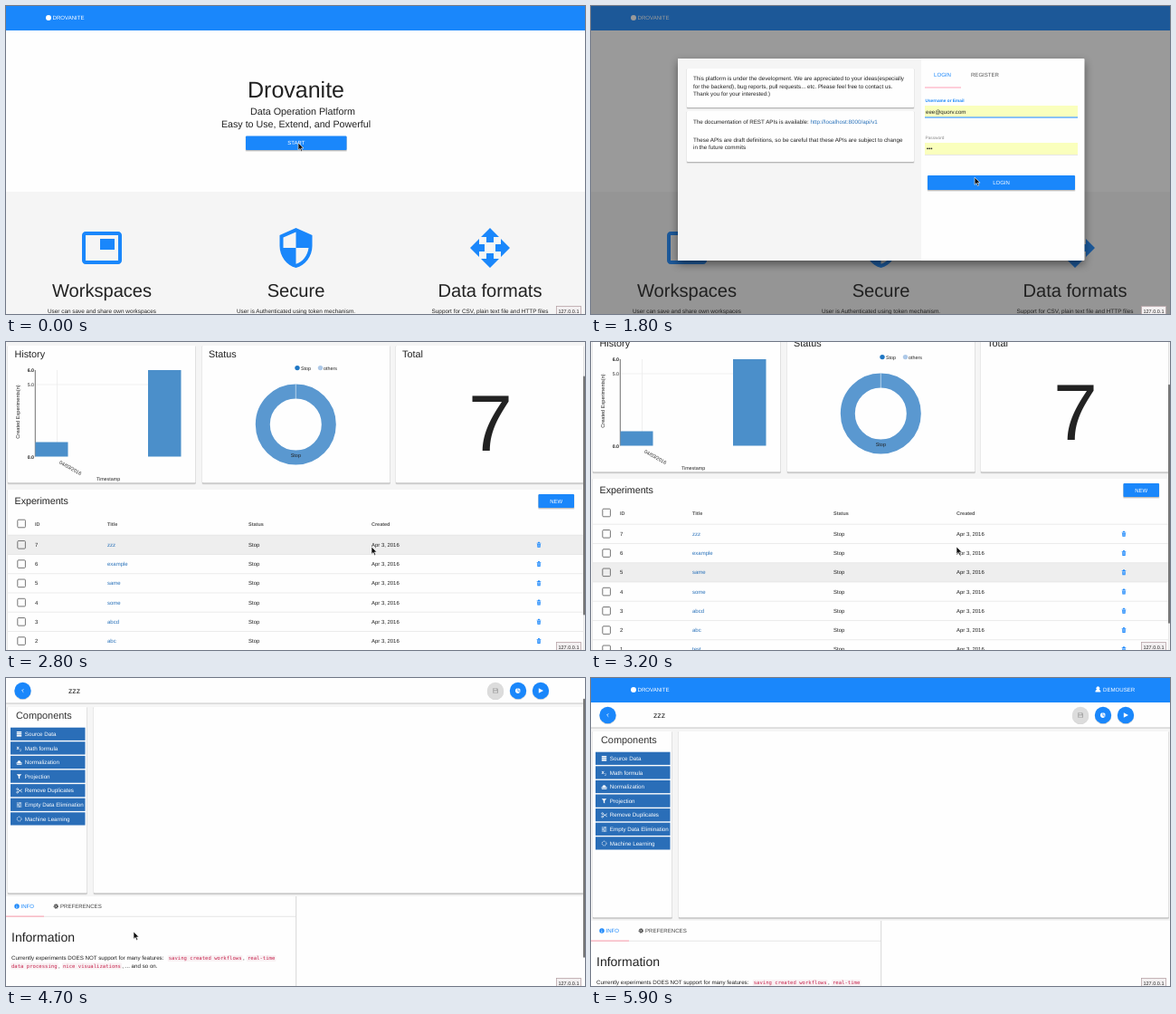
Animation of 640 by 340 pixels, one loop 6000 ms. Source, as an HTML page:

```html
<!DOCTYPE html>
<html lang="en">
<head>
<meta charset="utf-8">
<title>Data platform tour</title>
<style>
  html, body { margin: 0; width: 100%; height: 100%; overflow: hidden; background: #fefefe; }
  svg { display: block; width: 640px; height: 340px; }
  text { font-family: "Liberation Sans", Arial, sans-serif; text-rendering: geometricPrecision; white-space: pre; }
  .mono { font-family: "DejaVu Sans Mono", monospace; }
  .lift { filter: drop-shadow(0 4px 5px rgba(0, 0, 0, .45)); }
</style>
</head>
<body>
<svg id="stage" viewBox="0 0 640 340" xmlns="http://www.w3.org/2000/svg"></svg>
<script>
const LOOP = 6000, STEP = 100;
const BLUE = '#1a87fb', LINK = '#2a72ba', INK = '#222', PAPER = '#fefefe', GREY = '#f5f5f5', MUTED = '#a8a8a8';

// Drawing helpers
const rect = (x, y, w, h, fill, more = '') =>
  `<rect x="${x}" y="${y}" width="${w}" height="${h}" fill="${fill}" ${more}/>`;
const disc = (x, y, r, fill) => `<circle cx="${x}" cy="${y}" r="${r}" fill="${fill}"/>`;
const path = (d, fill, more = '') => `<path d="${d}" fill="${fill}" ${more}/>`;
const line = (d, color, w = 1) => path(d, 'none', `stroke="${color}" stroke-width="${w}"`);
const text = (x, y, s, size, fill = INK, more = '') =>
  `<text x="${x}" y="${y}" font-size="${size}" fill="${fill}" ${more}>${s}</text>`;
const MID = 'text-anchor="middle"', END = 'text-anchor="end"', BOLD = 'font-weight="bold"';
const group = (id, body) => `<g id="${id}">${body}</g>`;
const at = (x, y, body, scale = 1) => `<g transform="translate(${x} ${y}) scale(${scale})">${body}</g>`;
const card = (x, y, w, h, fill = PAPER) =>
  rect(x - .4, y + .3, w + .8, h + 1.4, '#000', 'opacity=".12" rx="1"') +
  rect(x, y + .8, w, h, '#000', 'opacity=".2" rx="1"') +
  rect(x, y, w, h, fill, 'rx="1"');
const button = (x, y, w, h, label) =>
  card(x, y, w, h, BLUE) + text(x + w / 2, y + h / 2 + 2.1, label, 6, '#fff', MID);

const person = path('M0 6V5Q0 3.6 1.6 3.4A2 2 0 1 1 4.2 3.4Q5.8 3.6 5.8 5V6Z', '#fff');
const header = user =>
  rect(0, 0, 640, 27, BLUE) + disc(47, 13, 3, '#fff') +
  text(51.5, 15.2, 'DROVANITE', 6.1, '#fff') +
  (user ? at(557.5, 9.5, person) + text(566, 15.2, 'DEMOUSER', 6.1, '#fff') : '');

// Landing page
const icons = {
  pip: 'M19 7h-8v6h8V7zm2-4H3c-1.1 0-2 .9-2 2v14c0 1.1.9 1.98 2 1.98h18c1.1 0 2-.88 2-1.98V5c0-1.1-.9-2-2-2zm0 16.01H3V4.98h18v14.03z',
  shield: 'M12 1L3 5v6c0 5.55 3.84 10.74 9 12 5.16-1.26 9-6.45 9-12V5l-9-4zm0 10.99h7c-.53 4.12-3.28 7.79-7 8.94V12H5V6.3l7-3.11v8.8z',
  move: 'M10 9h4V6h3l-5-5-5 5h3v3zm-1 1H6V7l-5 5 5 5v-3h3v-4zm14 2l-5-5v3h-3v4h3v3l5-5zm-9 3h-4v3H7l5 5 5-5h-3v-3z'
};
const feature = (x, icon, name, note) =>
  at(x - 24, 243, path(icons[icon], BLUE), 2) +
  text(x, 320.5, name, 20.1, INK, MID) + text(x, 338.5, note, 6.4, INK, MID);
const home =
  rect(0, 0, 640, 340, PAPER) + rect(0, 205, 640, 135, GREY) + header(false) +
  text(320.5, 100.5, 'Drovanite', 25, INK, MID) +
  text(328, 119.8, 'Data Operation Platform', 10.75, INK, MID) +
  text(320.5, 133.6, 'Easy to Use, Extend, and Powerful', 10.7, INK, MID) +
  button(265, 143.5, 111.5, 15.5, 'START') +
  feature(106, 'pip', 'Workspaces', 'User can save and share own workspaces') +
  feature(320.5, 'shield', 'Secure', 'User is Authenticated using token mechanism.') +
  feature(535, 'move', 'Data formats', 'Support for CSV, plain text file and HTTP files');

// Login dialog
const mail = 'eee@quorv.com', YELLOW = '#faffbd';
const notes = [
  [82.3, 'This platform is under the development. We are appreciated to your ideas(especially'],
  [90.8, 'for the backend), bug reports, pull requests... etc. Please feel free to contact us.'],
  [99.2, 'Thank you for your interested:)'],
  [130.2, `The documentation of REST APIs is available: <tspan fill="${LINK}">http://localhost:8000/api/v1</tspan>`],
  [149.8, 'These APIs are draft definitions, so be careful that these APIs are subject to change'],
  [158.2, 'in the future commits']
];
const dialog =
  rect(96, 58, 449.5, 223, PAPER, 'class="lift" rx="1"') +
  rect(96, 58, 269, 223, GREY) +
  card(106, 69, 251, 43) + card(106, 116, 251, 56) +
  notes.map(([y, s]) => text(113, y, s, 6.25)).join('') +
  text(379, 78.2, 'LOGIN', 6.1, BLUE) + text(420, 78.2, 'REGISTER', 6.05, '#555') +
  rect(369, 89.5, 40, 1, '#ff9fb8') +
  text(369.5, 105.6, 'Username or Email', 4.75, BLUE, BOLD) +
  rect(369, 110, 169, 12.5, YELLOW) +
  group('picked', rect(369.5, 112.5, 45, 8, '#a5cbed')) +
  text(370, 118.8, mail, 6.1) +
  rect(369, 122.5, 169, 1, BLUE) +
  text(369.5, 147, 'Password', 4.75, '#888') +
  rect(369, 151, 169, 13, YELLOW) + rect(369, 164, 169, .5, '#ccc') +
  [372, 374.2, 376.4].map(x => disc(x, 157.3, .85, INK)).join('') +
  group('choices', rect(369.5, 123.8, 168, 24, '#fff', `stroke="${MUTED}" stroke-width=".7"`) +
    text(371, 132.3, mail, 6.4) + text(371, 144.3, 'eee', 6.4)) +
  button(372, 187, 163, 16, 'LOGIN');

// Experiment list
const trash = path('M0 1h1.4V.2h1.8V1h1.4v.8H0zM.4 2.3h3.8L3.9 6H.7z', BLUE) +
  line('M1.6 2.8V5.4M3 2.8V5.4', '#fff', .4);
const box = y => rect(12.8, y - 4.3, 8.6, 8.6, PAPER, 'rx="1" stroke="#666" stroke-width=".9"');
const checkbox = y => box(y).replace(PAPER, 'none');
const ROW = 21.25, ROW_TOP = 261.2;
const titles = ['zzz', 'example', 'same', 'some', 'abcd', 'abc', 'test'];
const row = (name, i) => {
  const y = ROW_TOP + ROW * (i + .5), base = y + 2.1;
  return line(`M2 ${ROW_TOP + ROW * (i + 1)}H638`, '#ddd', .6) + checkbox(y) +
    text(32, base, 7 - i, 6) + text(112, base, name, 6, LINK) + text(268, base, 'Stop', 6) +
    text(404, base, 'Apr 3, 2016', 5.95) + at(586.7, y - 3.2, trash);
};
const heads = [[32, 'ID'], [112, 'Title'], [268, 'Status'], [404, 'Created']];
const chart =
  line('M32 95H193M56.5 79V174', '#e6e6e6', .6) + line('M32.3 79V174.5', '#333', .7) +
  rect(32.5, 158.5, 36, 16, '#4b8fca') + rect(157, 79, 36.5, 95.5, '#4b8fca') +
  text(31, 81, '6.0', 5.3, INK, `${END} ${BOLD}`) + text(31, 97, '5.0', 5.3, INK, END) +
  text(31, 176.5, '0.0', 5.3, INK, `${END} ${BOLD}`) +
  text(0, 0, 'Created Experiments(n)', 5.6, INK, MID + ' transform="translate(14.5 125) rotate(-90)"') +
  text(0, 0, '04/03/2016', 5.4, INK, 'transform="translate(58.5 182) rotate(29)"') +
  text(113, 201, 'Timestamp', 5.35, INK, MID);
const donut =
  `<circle cx="320.3" cy="139" r="36.5" fill="none" stroke="#5a98d0" stroke-width="16"/>` +
  line('M320.3 94V111', '#dceaf6', .7) + text(320.3, 175, 'Stop', 5.5, INK, MID) +
  disc(322, 76.6, 2.7, '#1f77c4') + text(326, 78.6, 'Stop', 5.4) +
  disc(347.5, 76.6, 2.7, '#aec9e8') + text(351, 78.6, 'others', 5.4);
const flask = path('M1.6 0H4v.7H3.6V2.4L5.6 5.4Q5.8 6 5 6H.6Q-.2 6 0 5.4L2 2.4V.7H1.6Z', BLUE);
const lab =
  rect(0, 0, 640, 440, GREY) + rect(0, 27, 640, 21, PAPER) + header(true) +
  at(9.5, 34.3, flask) + text(17, 39.7, 'EXPERIMENT', 6, BLUE) + rect(0, 47, 68, 1, '#f0506e') +
  [2, 217, 431].map(x => card(x, 52, 207.5, 151.5)).join('') +
  text(9.5, 65.3, 'History', 10.8) + text(224, 65.3, 'Status', 10.8) + text(438, 65.3, 'Total', 10.8) +
  chart + donut + text(535.5, 167.5, '7', 88, INK, MID) +
  card(2, 210.5, 636, 220) + text(9.5, 227.2, 'Experiments', 10.7) +
  button(588.5, 216, 39.5, 15, 'NEW') + checkbox(248.5) +
  heads.map(([x, s]) => text(x, 250.5, s, 5.5, '#555', BOLD)).join('') +
  rect(2, 0, 636, ROW, '#eee', 'id="hover"') +
  line(`M2 ${ROW_TOP}H638`, '#ddd', .6) + titles.map(row).join('');

// Workflow editor
const W = '#fff';
const parts = [
  ['Source Data', rect(0, 0, 5.4, 1.5, W) + rect(0, 2, 5.4, 1.5, W) + rect(0, 4, 5.4, 1.6, W)],
  ['Math formula', text(-.2, 4.9, 'x', 6, W, BOLD) + text(3.3, 6.3, '2', 3.8, W)],
  ['Normalization', path('M.8 2.5A2 2 0 0 1 4.6 2.5V3.4H6V4.2H-.4V3.4H.8ZM0 4.8H5.6V5.6H0Z', W)],
  ['Projection', path('M0 .4H5.4L3.4 2.8V5.8L2 4.8V2.8Z', W)],
  ['Remove Duplicates', line('M1.4 1.6L6 4.6M1.4 4.4L6 1.4', W, .7) +
    `<g fill="none" stroke="#fff" stroke-width=".7"><circle cx=".8" cy="1.2" r=".9"/><circle cx=".8" cy="4.8" r=".9"/></g>`],
  ['Empty Data Elimination', line('M0 1H5.6M0 3H5.6M0 5H5.6M3.8 .2V1.8M1.4 2.2V3.8M3.2 4.2V5.8', W, .7)],
  ['Machine Learning', `<circle cx="2.8" cy="3" r="2.4" fill="none" stroke="#fff" stroke-width=".9" stroke-dasharray="1.1 .78"/>`]
];
const part = ([name, icon], i) => {
  const y = 81.7 + 15.6 * i;
  return rect(5, y, 82.5, 14.2, '#2a6eb8') + at(11.8, y + 4.3, icon) + text(20.8, y + 9.3, name, 6.25, W);
};
const round = (x, fill, icon) => disc(x, 41.9, 9.2, '#00000026') + disc(x, 41, 9.2, fill) + icon;
const code = (x, y, s) =>
  rect(x - 1, y - 5.3, s.length * 3.372 + 2, 7, '#f9f2f4', 'rx="1"') + text(x, y, s, 5.6, '#c7254e', 'class="mono"');
const cog = disc(0, 0, 2, '#444') +
  `<circle r="2.3" fill="none" stroke="#444" stroke-width="1" stroke-dasharray="1.1 .706"/>` + disc(0, 0, .8, W);
const flow =
  rect(0, 0, 640, 410, PAPER) + rect(0, 54, 640, 214, GREY) +
  rect(0, 54, 640, 1.6, '#000', 'opacity=".18"') + rect(0, 27, 640, 27.5, PAPER) + header(true) +
  round(18.5, BLUE, line('M19.3 39.3L17.6 41L19.3 42.7', W, .8)) +
  text(69, 44.2, 'zzz', 8.7) +
  round(541, '#dcdcdc', path('M538.2 38.2H543L544 39.2V43.8H538.2Z', MUTED) +
    rect(539.3, 38.8, 3, 1.5, '#dcdcdc') + rect(539.3, 41.3, 3.6, 1.9, '#dcdcdc')) +
  round(566, BLUE, disc(565.8, 41.1, 2.8, W) + line('M565.8 38V41.1H569M565.8 41.1L568 43.3', BLUE, .6)) +
  round(591, BLUE, path('M588.8 38.2L594 41L588.8 43.8Z', W)) +
  card(2, 58.5, 87.5, 206) + card(97, 58.5, 541.5, 206) +
  text(11, 71.7, 'Components', 10.9, '#333') + parts.map(part).join('') +
  rect(0, 268, 640, 142, PAPER) + line('M320.7 268V410', '#ccc', .8) + line('M0 290.3H320.5', '#ddd', .7) +
  disc(12, 279, 2.7, BLUE) + text(12, 280.9, 'i', 4.8, W, `${MID} ${BOLD}`) +
  text(16.5, 281.1, 'INFO', 6.1, BLUE) + rect(0, 289.6, 42, 1, '#ff9fb0') +
  at(55.3, 279, cog) + text(60, 281.1, 'PREFERENCES', 6.1, '#444') +
  text(6, 318.3, 'Information', 14) +
  text(6, 338.3, 'Currently experiments DOES NOT support for many features:', 6.2) +
  code(179.7, 338.3, 'saving created workflows') + text(262, 338.3, ',', 6.2) + code(267, 338.3, 'real-time') +
  code(6, 346.8, 'data processing') + text(58, 346.8, ',', 6.2) +
  code(63, 346.8, 'nice visualizations') + text(128.3, 346.8, ', ... and so on.', 6.2);

// Fixed layer
const overlay =
  rect(638, 0, 2, 10, '#777', 'id="bar" rx="1"') +
  rect(608.5, 331.5, 27, 12, '#f3f0f1', 'stroke="#b9a5a8" stroke-width=".8"') +
  text(610.5, 338.9, '127.0.0.1', 5.5) +
  group('arrow', path('M0 0V8.2L2 6.4L3.3 9.4L4.7 8.8L3.4 5.9H6Z', '#111', 'stroke="#fff" stroke-width=".6"')) +
  group('beam', line('M-2-4Q0-4 0-3Q0-4 2-4M0-3V3.5M-2 4.5Q0 4.5 0 3.5Q0 4.5 2 4.5M-1 .8H1', '#111', .9));

const stage = document.getElementById('stage');
stage.innerHTML = group('home', home) + rect(0, 0, 640, 340, '#212121', 'id="dim"') +
  group('dialog', dialog) + group('lab', lab) + group('flow', flow) + overlay;

// Motion
const $ = id => document.getElementById(id);
const show = (id, on) => $(id).setAttribute('display', on ? 'inline' : 'none');
const move = (id, x, y) => $(id).setAttribute('transform', `translate(${x} ${y})`);
const clamp = v => Math.max(0, Math.min(1, v));
const ease = v => v * v * (3 - 2 * v);
// Keys are [time, ...values]; returns the values at t.
function track(keys, t, curve = v => v) {
  let i = 0;
  while (i < keys.length - 2 && t >= keys[i + 1][0]) i++;
  const [a, b] = [keys[i], keys[i + 1]];
  const k = curve(clamp((t - a[0]) / (b[0] - a[0])));
  return a.slice(1).map((v, j) => v + (b[j + 1] - v) * k);
}
const pointer = [
  [0, 323, 151], [400, 323, 151], [900, 416, 113], [1400, 416, 113], [1900, 425, 198], [2300, 425, 198],
  [2700, 404, 226], [3500, 404, 226], [4000, 116, 271], [4300, 116, 271], [4600, 141, 280],
  [5300, 141, 280], [5700, 200, 345]
];
const labScroll = [[2600, 0], [3000, 96], [3100, 96], [3200, 60], [3500, 0]];
const flowScroll = [[4500, 0], [4700, 27], [4900, 64], [5200, 64], [5500, 0]];

function draw(t) {
  const page = t < 2400 ? 'home' : t < 4300 ? 'lab' : 'flow';
  for (const id of ['home', 'lab', 'flow']) show(id, id === page);

  const opening = ease(clamp((t - 100) / 400)), closing = clamp((t - 2100) / 110);
  const seen = opening * (1 - closing), size = (.5 + .5 * opening) * (1 - .5 * closing);
  show('dialog', seen > 0);
  $('dialog').setAttribute('opacity', seen);
  $('dialog').setAttribute('transform', `translate(320.5 169.5) scale(${size}) translate(-320.5 -169.5)`);
  $('dim').setAttribute('opacity', page === 'home' ? .45 * opening * clamp(1 - closing * 1.2) : 0);
  const typing = t >= 900 && t < 1400;
  show('choices', typing);
  show('picked', typing);

  const [x, y] = track(pointer, t, ease);
  const onLink = t >= 4000 && t < 4300;
  for (const id of ['arrow', 'beam']) move(id, x, y);
  show('beam', typing || onLink);
  show('arrow', !typing && !onLink && t < 5700);

  const [ls] = track(labScroll, t), [fs] = track(flowScroll, t);
  move('lab', 0, -ls);
  move('flow', 0, -fs);
  // The hovered row is refreshed only once scrolling stops.
  const still = t >= 3000 && t < 3500 ? 96 : ls;
  const hit = Math.floor((y + still - ROW_TOP) / ROW);
  show('hover', hit >= 0 && hit < titles.length);
  $('hover').setAttribute('y', ROW_TOP + ROW * hit);

  const inLab = page === 'lab';
  show('bar', inLab ? t >= 2600 : t >= 4500 && t < 5700);
  $('bar').setAttribute('y', inLab ? ls * .78 : fs * .84);
  $('bar').setAttribute('height', inLab ? 264 : 286);
}

const start = performance.now();
function tick() {
  const t = (performance.now() - start) % LOOP;
  draw(Math.floor(t / STEP) * STEP);
  requestAnimationFrame(tick);
}
tick();
</script>
</body>
</html>
```
